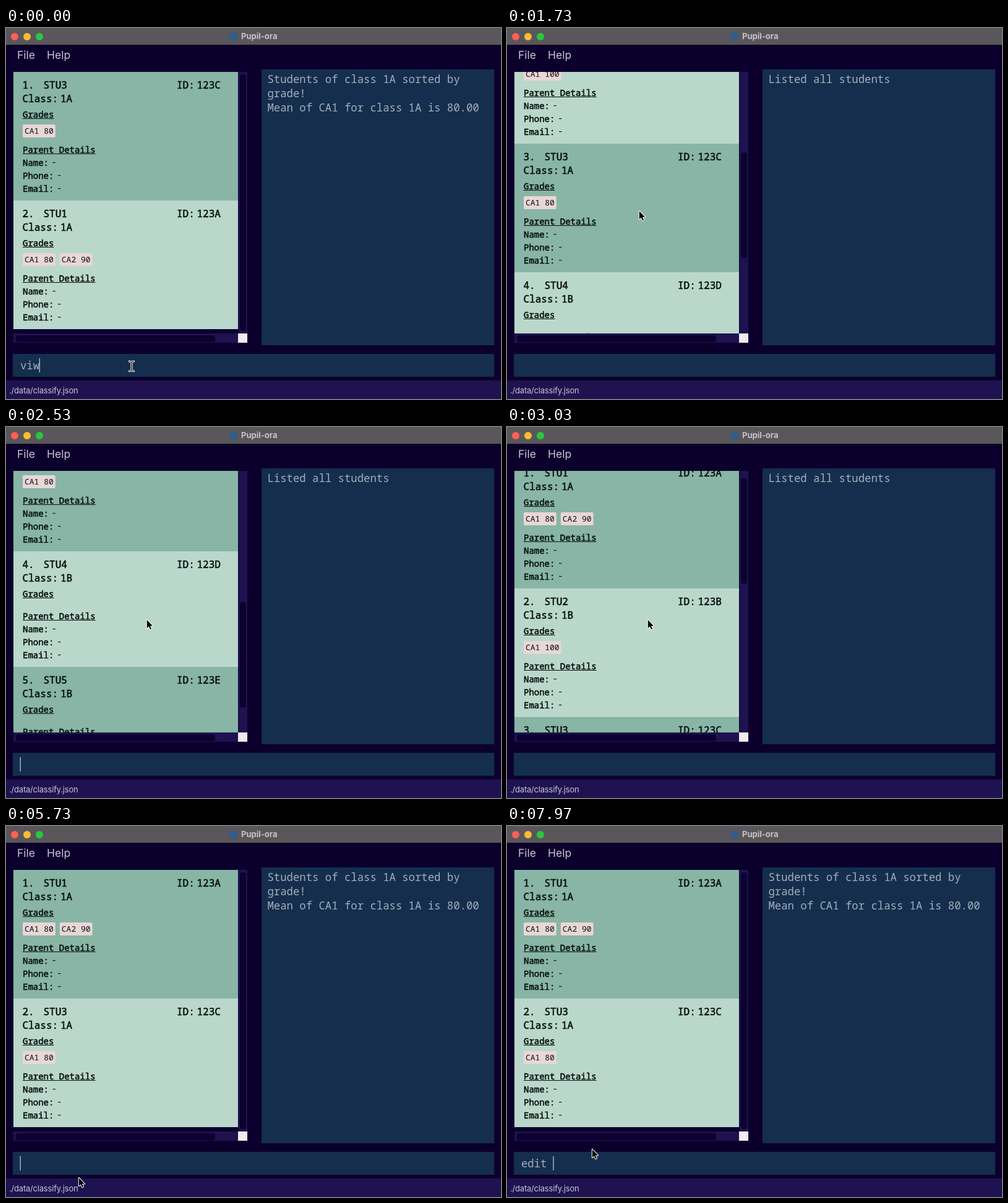
Write an HTML page with a canvas that moves like this. It is 800x600 px and loops after 8 s.

```html
<!DOCTYPE html>
<html lang="en">
<head>
<meta charset="utf-8">
<title>Pupil-ora</title>
<style>
html, body { margin: 0; width: 100%; height: 100%; overflow: hidden; background: #0b002c; }
canvas { display: block; width: 800px; height: 600px; }
</style>
</head>
<body>
<canvas id="stage" width="800" height="600"></canvas>
<script>
const ctx = document.getElementById('stage').getContext('2d');
const LOOP = 8000, LIST_AT = 1050, SORT_AT = 5350;
const MONO = '"Noto Sans Mono", "DejaVu Sans Mono", monospace';
const SANS = 'Inter, Roboto, sans-serif';
const INK = '#07100d', PALE = '#c9c6d2', OUTPUT = '#a3aebb';
const LIST_TOP = 71, LIST_HEIGHT = 423, MAX_SCROLL = 575;

const students = [
  { name: 'STU1', id: '123A', group: '1A', grades: ['CA1 80', 'CA2 90'] },
  { name: 'STU2', id: '123B', group: '1B', grades: ['CA1 100'] },
  { name: 'STU3', id: '123C', group: '1A', grades: ['CA1 80'] },
  { name: 'STU4', id: '123D', group: '1B', grades: [] },
  { name: 'STU5', id: '123E', group: '1B', grades: [] }
];
const sortedMessage = ['Students of class 1A sorted by', 'grade!', 'Mean of CA1 for class 1A is 80.00'];

// [time, content of the command box]
const commands = [
  [0, 'viw'], [130, 'vi'], [250, 'vie'], [370, 'view'], [560, 'viewA'], [700, 'viewAl'],
  [820, 'viewAll'], [LIST_AT, ''], [4500, 'viewStats class/1A exam/CA1 filter/off'], [SORT_AT, ''],
  [7400, 'e'], [7540, 'ed'], [7650, 'edi'], [7750, 'edit'], [7850, 'edit ']
];
// [time, values...]
const scrollKeys = [[1450, 0], [1730, 299], [2050, 575], [2400, 575], [2530, 495], [3050, 0]];
const pointerKeys = [
  [1250, 203, 547], [1500, 213, 295], [1730, 213, 295], [2530, 227, 311], [3250, 227, 311],
  [3700, 190, 620], [5450, 125, 620], [5680, 117, 568], [6300, 117, 568], [6750, 137, 522]
];

function sample(keys, t) {
  const next = keys.findIndex(k => k[0] > t);
  if (next === 0) return keys[0].slice(1);
  if (next < 0) return keys[keys.length - 1].slice(1);
  const a = keys[next - 1], b = keys[next], u = (t - a[0]) / (b[0] - a[0]);
  return a.slice(1).map((v, i) => v + (b[i + 1] - v) * u);
}

function rect(x, y, w, h, color, radius = 0) {
  ctx.fillStyle = color;
  ctx.beginPath();
  ctx.roundRect(x, y, w, h, radius);
  ctx.fill();
}

function disc(x, y, r, color) {
  ctx.fillStyle = color;
  ctx.beginPath();
  ctx.arc(x, y, r, 0, 7);
  ctx.fill();
}

function text(str, x, y, size, color = INK, family = MONO, weight = 400) {
  ctx.font = `${weight} ${size}px ${family}`;
  ctx.fillStyle = color;
  ctx.fillText(str, x, y);
}

// A thin outline gives the regular face a medium weight.
function medium(str, x, y, size) {
  text(str, x, y, size);
  ctx.strokeStyle = INK;
  ctx.lineWidth = 0.55;
  ctx.strokeText(str, x, y);
}

function heading(str, x, y) {
  medium(str, x, y, 14);
  rect(x, y + 1, ctx.measureText(str).width, 1, INK);
}

function drawCard(student, index, top) {
  const hasGrades = student.grades.length > 0;
  const height = hasGrades ? 208 : 187;
  rect(12, top, 363, height, index % 2 ? '#bad7cb' : '#88b5a5');
  medium(`${index + 1}.`, 26.5, top + 27, 16);
  medium(student.name, 60.5, top + 27, 16);
  medium('ID:', 276, top + 27, 16);
  medium(student.id, 308.5, top + 27, 16);
  medium('Class:', 26.5, top + 49, 16);
  medium(student.group, 88, top + 49, 16);
  heading('Grades', 27, top + 74);
  let x = 27;
  for (const grade of student.grades) {
    const width = grade.length * 7.8 + 6;
    rect(x, top + 85, width, 21, '#e9d6d7', 2);
    text(grade, x + 3, top + 100, 13);
    x += width + 7;
  }
  const y = top + (hasGrades ? 131 : 110);
  heading('Parent Details', 27, y);
  ['Name:', 'Phone:', 'Email:'].forEach((label, i) => {
    const baseline = y + 21 * (i + 1);
    medium(label, 27, baseline, 14);
    text('-', 31.5 + label.length * 8.4, baseline - 1, 14);
  });
  return height;
}

function drawList(shown, scroll) {
  ctx.save();
  ctx.beginPath();
  ctx.rect(12, LIST_TOP, 363, LIST_HEIGHT);
  ctx.clip();
  let y = LIST_TOP - Math.round(scroll);
  shown.forEach((student, i) => { y += drawCard(student, i, y); });
  ctx.restore();

  const scrollable = shown.length > 2;
  rect(376, LIST_TOP, 14, LIST_HEIGHT, '#1e1250');
  rect(378, 75 + scroll / MAX_SCROLL * 242, 10, scrollable ? 171 : 415, '#0b002f', 4);
  rect(12, 494, 363, 15, '#1e1250');
  rect(16, 497, 322, 11, '#0b002f', 4);
  rect(375, 494, 15, 15, '#eeecee');
}

function drawWindow() {
  rect(0, 0, 800, 600, '#0b002c');
  rect(0, 0, 800, 28, '#59575b');
  rect(0, 27, 800, 1, '#151019');
  ['#fe5f57', '#febc2e', '#28c840'].forEach((color, i) => disc(14 + 20 * i, 14, 6, color));
  disc(368, 14, 6.5, '#2f5d91');
  text('Pupil-ora', 380, 18, 13, '#c6c4c7', SANS, 700);
  text('File', 18, 50, 17.5, PALE, SANS);
  text('Help', 66, 50, 17.5, PALE, SANS);
  rect(413, 67, 376, 446, '#152e4d');
  rect(11, 527, 778, 37, '#152e4d');
  rect(0, 570, 800, 30, '#1e1250');
  ctx.letterSpacing = '-0.2px';
  text('./data/classify.json', 5, 591, 13, PALE, SANS);
  ctx.letterSpacing = '0px';
}

function drawCommand(t) {
  const [changed, command] = commands.filter(c => c[0] <= t).pop();
  text(command, 23, 552, 17.3, OUTPUT);
  if ((t - changed) % 1000 < 500) rect(22.5 + command.length * 10.38, 534, 1.3, 23, '#bcc4cd');
}

function outlined(path, x, y) {
  ctx.save();
  ctx.translate(x, y);
  ctx.lineJoin = 'round';
  ctx.strokeStyle = '#fff';
  ctx.fillStyle = '#000';
  ctx.lineWidth = 2;
  ctx.stroke(path);
  ctx.fill(path);
  ctx.restore();
}

const arrow = new Path2D('M.8 1V14.2L3.8 11.4L6 16.3L8 15.4L5.9 10.7H10Z');
const beam = new Path2D('M-4-8.5Q-.7-8.5 0-6.5Q.7-8.5 4-8.5V-7.5Q.6-7.5.6-5V5Q.6 7.5 4 7.5V8.5Q.7 8.5 0 6.5Q-.7 8.5-4 8.5V7.5Q-.6 7.5-.6 5V-5Q-.6-7.5-4-7.5Z');

function draw(t) {
  const listed = t >= LIST_AT && t < SORT_AT;
  const [s1, , s3] = students;
  const shown = listed ? students : t < LIST_AT ? [s3, s1] : [s1, s3];
  const message = listed ? ['Listed all students'] : sortedMessage;
  drawWindow();
  drawList(shown, sample(scrollKeys, t)[0]);
  message.forEach((line, i) => text(line, 422.5, 89 + 23 * i, 17.3, OUTPUT));
  drawCommand(t);
  const [x, y] = sample(pointerKeys, t);
  outlined(y > 527 && y < 564 ? beam : arrow, x, y);
}

function frame() {
  draw(performance.now() % LOOP);
  requestAnimationFrame(frame);
}
frame();
</script>
</body>
</html>
```
